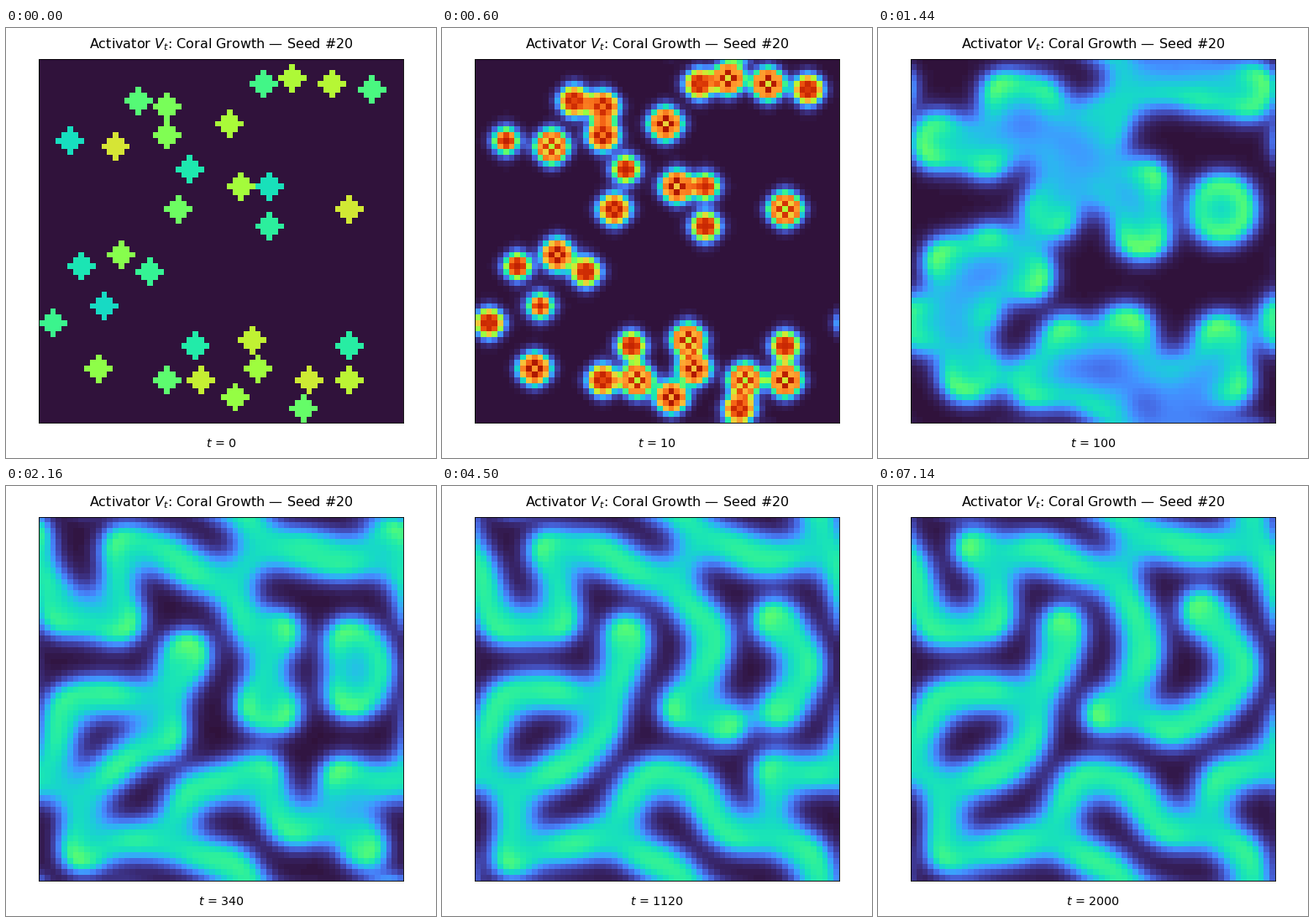
Animation, 512 px wide and 512 px high, one loop 8 s. Source, as a matplotlib script:

```python
import matplotlib.pyplot as plt
import numpy as np
from matplotlib.animation import FuncAnimation

SIZE, DPI = 512, 128
LEFT, TOP, SIDE = 39.4, 36.9, 433.2
GRID = 64
DU, DV, FEED, KILL = 0.2, 0.1, 0.0545, 0.062
TICK, STEP, LOOP = 20, 60, 8000
SHOTS = 120

# Seed centres (column, row), from the weakest to the strongest
CENTRES = [
    (11, 43), (5, 14), (40, 22), (7, 36), (26, 19), (27, 50), (54, 50),
    (40, 29), (19, 37), (2, 46), (39, 4), (58, 5), (17, 7), (22, 56),
    (46, 61), (24, 26), (22, 8), (22, 13), (14, 34), (10, 54), (34, 59),
    (38, 54), (35, 22), (33, 11), (44, 3), (51, 4), (54, 56), (37, 49),
    (28, 56), (47, 56), (54, 26), (13, 15),
]


def laplacian(a):
    return sum(np.roll(a, shift, axis)
               for shift in (1, -1) for axis in (0, 1)) - 4 * a


def shot_time(shot):
    """Single steps at first, then twenty at a time."""
    return shot if shot < 20 else 20 * (shot - 19)


def seeded_field():
    v = np.zeros((GRID, GRID))
    rows, cols = np.mgrid[:GRID, :GRID]
    levels = np.linspace(0.31, 0.58, len(CENTRES))
    for (col, row), level in zip(CENTRES, levels):
        v[(cols - col) ** 2 + (rows - row) ** 2 <= 4] = level
    return v


def simulate():
    """Gray-Scott reaction and diffusion on a torus."""
    v = seeded_field()
    u = np.ones_like(v)
    states, now = [], 0
    for shot in range(SHOTS):
        while now < shot_time(shot):
            reaction = u * v * v
            u, v = (u + DU * laplacian(u) - reaction + FEED * (1 - u),
                    v + DV * laplacian(v) + reaction - (FEED + KILL) * v)
            now += 1
        states.append(v)
    return states


def caption(y, text, size):
    return fig.text(0.5, 1 - y / SIZE, text, fontsize=size,
                    ha="center", va="baseline")


states = simulate()

plt.rcParams["font.family"] = "DejaVu Sans"
fig = plt.figure(figsize=(SIZE / DPI, SIZE / DPI), dpi=DPI, facecolor="white")
ax = fig.add_axes([LEFT / SIZE, 1 - (TOP + SIDE) / SIZE,
                   SIDE / SIZE, SIDE / SIZE])
ax.set(xticks=[], yticks=[])
ax.spines[:].set_linewidth(0.5)
image = ax.imshow(states[0], cmap="turbo", vmin=0, vmax=1,
                  interpolation="nearest")
caption(24.2, "Activator $V_t$: Coral Growth — Seed #20", 9)
label = caption(498.8, "", 8)


def update(frame):
    shot = min(frame * TICK // STEP, SHOTS - 1)
    image.set_data(states[shot])
    label.set_text(f"$t$ = {shot_time(shot)}")
    return image, label


anim = FuncAnimation(fig, update, frames=LOOP // TICK, interval=TICK,
                     repeat=True, repeat_delay=0)
plt.show()
```
